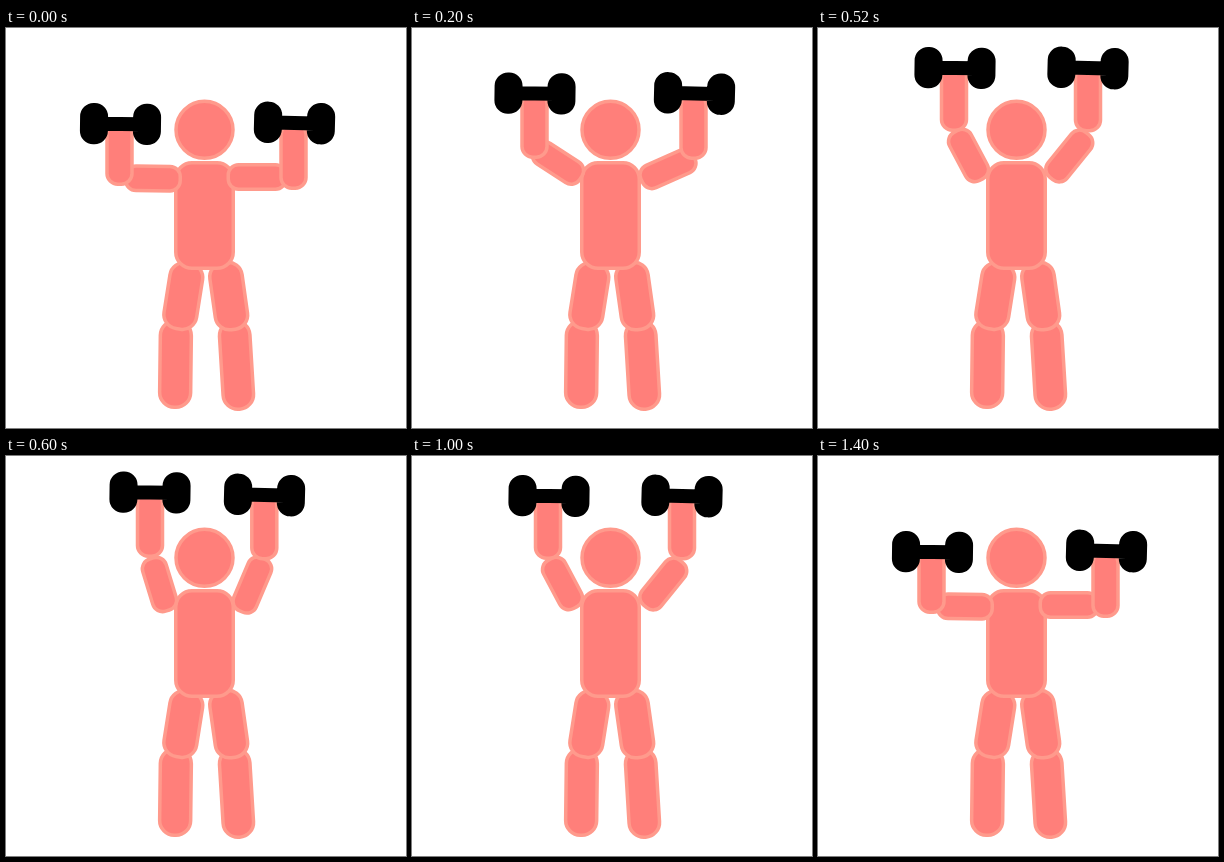
An HTML page with a canvas that plays this animation: 400 px wide and 400 px high, repeating every 1.6 s.

```html
<!DOCTYPE html>
<html lang="en">
<head>
<meta charset="utf-8">
<title>Dumbbell press</title>
<style>
  html, body { margin: 0; width: 100%; height: 100%; overflow: hidden; background: #fff; }
  canvas { display: block; }
</style>
</head>
<body>
<canvas id="stage" width="400" height="400"></canvas>
<script>
const ctx = document.getElementById('stage').getContext('2d');
const SKIN = '#ff7f7a', EDGE = '#ff9a8c', LINE = 3.5;
const STEP = 200;
const ORDER = [0, 1, 2, 3, 3, 2, 1, 0];

// upper: x, y, degrees; fore: centre x, bottom y; bell: centre x, y
const POSES = [
  { left:  { upper: [147, 150.5, 0.5], fore: [113.5, 158], bell: [114.5, 96] },
    right: { upper: [251, 149, 0], fore: [287.5, 162], bell: [288.5, 95] } },
  { left:  { upper: [146, 135, 33], fore: [122.5, 131], bell: [123, 65.5] },
    right: { upper: [256, 141, -24], fore: [281.5, 132], bell: [282.5, 65.5] } },
  { left:  { upper: [150.5, 127.5, 62], fore: [136, 104], bell: [137, 40] },
    right: { upper: [251.3, 128, -51], fore: [270, 104.5], bell: [270, 40] } },
  { left:  { upper: [153.5, 128.5, 73], fore: [144, 102], bell: [144, 36.5] },
    right: { upper: [246.3, 129, -67], fore: [258.3, 104.5], bell: [258.5, 39] } }
];

function rotated(x, y, deg, draw) {
  ctx.save();
  ctx.translate(x, y);
  ctx.rotate(deg * Math.PI / 180);
  draw();
  ctx.restore();
}

// Rounded body part; w and h include the outline.
function part(x, y, w, h, r, deg = 0) {
  rotated(x, y, deg, () => {
    ctx.beginPath();
    ctx.roundRect((LINE - w) / 2, (LINE - h) / 2, w - LINE, h - LINE, r - LINE / 2);
    ctx.fill();
    ctx.stroke();
  });
}

function dumbbell(x, y, deg) {
  rotated(x, y, deg, () => {
    ctx.fillStyle = '#000';
    ctx.beginPath();
    ctx.rect(-20, -7, 40, 14);
    for (const cx of [-26.5, 26.5]) ctx.roundRect(cx - 14, -20.7, 28, 41.4, 13.5);
    ctx.fill();
  });
}

function arm({ upper: [ux, uy, deg], fore: [fx, bottom], bell }, length, tilt) {
  part(ux, uy, length, 28, 12, deg);
  part(fx, bottom - 34, 28.5, 68, 12.5);
  ctx.save();
  dumbbell(...bell, tilt);
  ctx.restore();
}

function drawBody() {
  part(169.5, 336, 34.5, 90, 16.5, 0.7);
  part(230.5, 337, 34, 92, 16.5, -3.5);
  part(177.3, 268, 36.5, 70, 16, 9);
  part(222.7, 268, 36, 71, 16, -8);
  part(198.5, 187.5, 61, 109, 18);
  part(198.5, 101.8, 60.5, 60.5, 30.25);
}

function frame(now) {
  const pose = POSES[ORDER[Math.floor(now / STEP) % ORDER.length]];
  ctx.fillStyle = '#fff';
  ctx.fillRect(0, 0, 400, 400);
  ctx.fillStyle = SKIN;
  ctx.strokeStyle = EDGE;
  ctx.lineWidth = LINE;
  drawBody();
  arm(pose.left, 58, 0.8);
  arm(pose.right, 61, 1.5);
  requestAnimationFrame(() => frame(performance.now()));
}
frame(performance.now());
</script>
</body>
</html>
```
